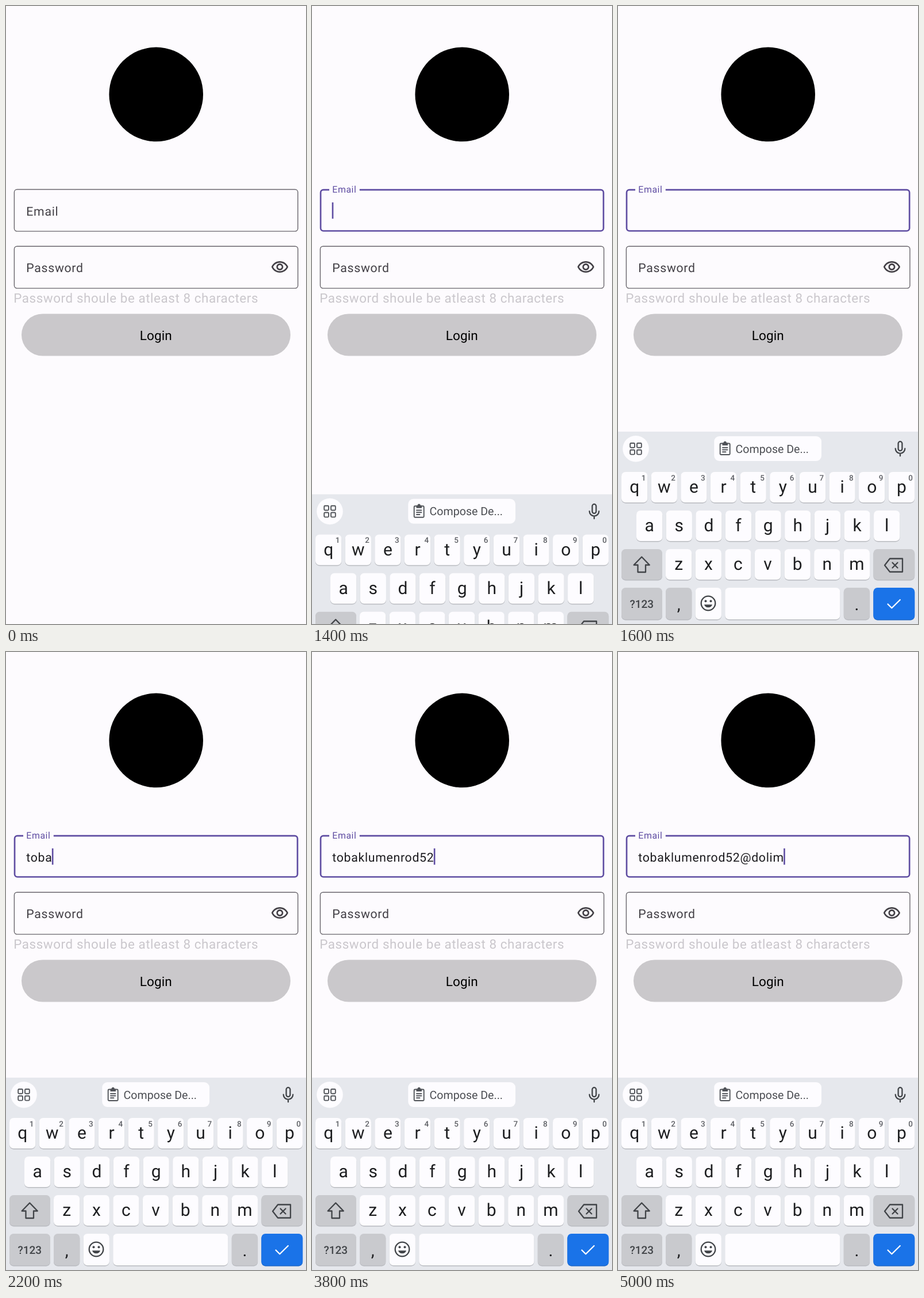
Animation of 522 by 1073 pixels, one loop 5.1 s. Source, as an HTML page:

```html
<!DOCTYPE html>
<html lang="en">
<head>
<meta charset="utf-8">
<title>Login form</title>
<style>
  html, body { margin: 0; width: 100%; height: 100%; overflow: hidden; background: #fdfbfe; }
  svg { display: block; width: 522px; height: 1073px; font-family: Roboto, sans-serif; text-rendering: geometricPrecision; }
  text { white-space: pre; }
  .field { fill: none; stroke: #68656c; stroke-width: 1.4; }
  .body { font-size: 21.27px; letter-spacing: .69px; fill: #434046; }
  .typed { fill: #1c1b1f; }
  .line { fill: none; stroke: #414448; stroke-width: 2.3; stroke-linejoin: round; stroke-linecap: round; }
  .thin { stroke: #505358; stroke-width: 1.9; }
  .mid { text-anchor: middle; }
  .letter { font-size: 30px; fill: #1d1e20; }
  .hint { font-size: 13.5px; font-weight: 500; fill: #5d5f64; }
</style>
</head>
<body>
<svg viewBox="0 0 522 1073">
  <rect width="522" height="1073" fill="#fdfbfe"/>
  <circle cx="261.2" cy="153.4" r="81.8"/>

  <rect class="field" id="box" rx="4.8"/>
  <rect id="notch" x="30" y="315" height="8" fill="#fdfbfe"/>
  <text class="body" id="label" x="35.3">Email</text>
  <text class="body typed" id="typed" x="35.3" y="363.8"></text>
  <rect id="caret" y="341" width="2.6" height="28.3" fill="#5f4da2"/>

  <rect class="field" x="14.4" y="417.2" width="493.5" height="72.9" rx="4.8"/>
  <text class="body" x="35.3" y="462.2">Password</text>
  <path transform="translate(460.5 437.7) scale(1.329)" fill="#444147" d="M12 6c3.79 0 7.17 2.13 8.82 5.5C19.17 14.87 15.79 17 12 17s-7.17-2.13-8.82-5.5C4.83 8.13 8.21 6 12 6m0-2C7 4 2.73 7.11 1 11.5 2.73 15.89 7 19 12 19s9.27-3.11 11-7.5C21.27 7.11 17 4 12 4zm0 5c1.38 0 2.5 1.12 2.5 2.5S13.38 14 12 14s-2.5-1.12-2.5-2.5S10.62 9 12 9m0-2c-2.48 0-4.5 2.02-4.5 4.5S9.52 16 12 16s4.5-2.02 4.5-4.5S14.48 7 12 7z"/>
  <text x="13.3" y="514.8" font-size="22.4" letter-spacing=".57" fill="#cac7cc">Password shoule be atleast 8 characters</text>
  <rect x="27" y="534.6" width="468" height="72.8" rx="36.4" fill="#cac8cb"/>
  <text class="mid" x="260.8" y="580" font-size="22.6" letter-spacing=".1">Login</text>

  <g id="board">
    <rect y="739" width="522" height="340" fill="#e6e8ed"/>
    <circle cx="31" cy="768.7" r="22.8" fill="#fdfcff"/>
    <g class="line thin">
      <rect x="21.2" y="759" width="7.8" height="7.8" rx="1.5"/>
      <rect x="33" y="759" width="7.8" height="7.8" rx="1.5"/>
      <rect x="21.2" y="770.8" width="7.8" height="7.8" rx="1.5"/>
      <rect x="33" y="770.8" width="7.8" height="7.8" rx="1.5"/>
    </g>
    <rect x="167.3" y="747" width="186.7" height="43" rx="9" fill="#fdfcff"/>
    <rect class="line thin" x="177.7" y="759.5" width="17" height="19.5" rx="1.5"/>
    <path d="M181.5 758.5h9.5v4.500h-9.500z" fill="#505358"/>
    <circle cx="186.2" cy="758.3" r="2.6" fill="#505358"/>
    <path class="line thin" d="M182 766.7h8.5M182 770.5h8.5M182 774.3h5.5"/>
    <text x="204.6" y="775.7" font-size="19.6" fill="#4b4d52">Compose De...</text>
    <rect class="line" x="487.6" y="756.2" width="6.8" height="16" rx="3.4"/>
    <path class="line" d="M482.7 768.5a8.3 8.3 0 0 0 16.6 0M491 777v4.3"/>
    <g id="keys"></g>
    <path class="line" d="M41.2 956.5 54.8 970.5H48V983H34.5V970.5H27.6Z"/>
    <path class="line" d="M473 959.5H495V982.5H473L464 971ZM477.500 966.5l9 9m0-9-9 9"/>
    <circle class="line" cx="157" cy="1037" r="12.3"/>
    <g fill="#414448">
      <circle cx="152.5" cy="1033.2" r="2"/>
      <circle cx="161.5" cy="1033.2" r="2"/>
      <path d="M150 1039.3h14a7.2 6.5 0 0 1-14 0z"/>
    </g>
    <path class="line" style="stroke:#fff" d="M469.5 1038.5l6.8 6.8L490.8 1031"/>
  </g>
</svg>
<script>
  const $ = id => document.getElementById(id);
  const set = (el, attrs) => { for (const k in attrs) el.setAttribute(k, attrs[k]); };
  const add = (tag, attrs, text) => {
    const el = document.createElementNS('http://www.w3.org/2000/svg', tag);
    set(el, attrs);
    if (text) el.textContent = text;
    $('keys').append(el);
  };

  const PITCH = 51.63, WHITE = '#fdfcff', DARK = '#c9cace';

  function key(x, y, w, h, fill, shade = '#b9bbc0') {
    add('rect', { x, y: y + 1.4, width: w, height: h, rx: 7, fill: shade });
    add('rect', { x, y, width: w, height: h, rx: 7, fill });
  }

  function row(letters, x0, y, hints) {
    [...letters].forEach((c, i) => {
      const x = x0 + i * PITCH;
      key(x, y, 45.3, 53, WHITE);
      add('text', { class: 'letter mid', x: x + 22.7, y: y + 36.3 }, c);
      if (hints) add('text', { class: 'hint mid', x: x + 38.5, y: y + 14.5 }, hints[i]);
    });
  }

  row('qwertyuiop', 6, 809, '1234567890');
  row('asdfghjkl', 32, 876);
  row('zxcvbnm', 83, 943);
  key(6, 943, 71, 53, DARK);
  key(444.4, 943, 71.8, 53, DARK);
  key(6, 1010, 71, 55, DARK);
  key(83, 1010, 45.3, 55, DARK);
  key(134.6, 1010, 45.3, 55, WHITE);
  key(186.2, 1010, 200.2, 55, WHITE);
  key(392.8, 1010, 45.3, 55, DARK);
  key(444.4, 1010, 71.8, 55, '#1a73e8', '#1a66c8');
  add('text', { class: 'mid', x: 41.3, y: 1045, 'font-size': 19, 'font-weight': 500, fill: '#414448' }, '?123');
  add('text', { class: 'mid letter', x: 105.8, y: 1049 }, ',');
  add('text', { class: 'mid letter', x: 415.5, y: 1049 }, '.');

  const LOOP = 5100, STEP = 100;
  const EMAIL = 'tobaklumenrod52@dolim';
  // keystroke times in steps
  const STROKES = [18, 19, 21, 22, 24, 25, 26, 28, 29, 30, 31, 32, 34, 35, 38, 42, 44, 46, 47, 48, 50];

  const lerp = (a, b, p) => a + (b - a) * p;
  const bez = (u, a, b) => 3 * u * (1 - u) ** 2 * a + 3 * u * u * (1 - u) * b + u ** 3;

  // cubic-bezier(.4, 0, .2, 1)
  function ease(x) {
    if (x <= 0) return 0;
    if (x >= 1) return 1;
    let lo = 0, hi = 1;
    for (let i = 0; i < 24; i++) {
      const u = (lo + hi) / 2;
      if (bez(u, .4, .2) < x) lo = u; else hi = u;
    }
    return bez(lo, 0, 1);
  }

  function draw(t) {
    const shrink = ease((t - 1070) / 150);
    const rise = ease((t - 1085) / 150);
    const focus = rise > .1 ? rise : 0;
    const tint = (a, b) => Math.round(lerp(a, b, focus));
    const line = lerp(1.4, 2.66, focus);

    set($('box'), { x: 13.7 + line / 2, y: 317.8 + line / 2, width: 494.8 - line, height: 74 - line });
    $('box').style.strokeWidth = line;
    $('box').style.stroke = `rgb(${tint(104, 95)},${tint(101, 77)},${tint(108, 162)})`;
    set($('notch'), { width: focus * 52.8 });

    set($('label'), { y: lerp(363.9, 323.7, rise) });
    $('label').style.fontSize = lerp(21.27, 15.95, shrink) + 'px';
    $('label').style.letterSpacing = lerp(.69, .53, shrink) + 'px';
    $('label').style.fill = `rgb(${tint(67, 95)},${tint(64, 77)},${tint(70, 162)})`;

    const count = STROKES.filter(s => s * STEP <= t).length;
    $('typed').textContent = EMAIL.slice(0, count);
    const width = count ? $('typed').getComputedTextLength() : 0;
    const lit = t >= 1100 && (t < 1600 || t >= 1800);
    set($('caret'), { x: 34.7 + width, visibility: lit ? 'visible' : 'hidden' });

    const slide = ease((t - 1281) / 275);
    set($('board'), { transform: `translate(0 ${lerp(335, 0, slide)})` });
  }

  const start = performance.now();
  function tick() {
    const t = (performance.now() - start) % LOOP;
    draw(Math.floor(t / STEP) * STEP);
    requestAnimationFrame(tick);
  }
  tick();
</script>
</body>
</html>
```
